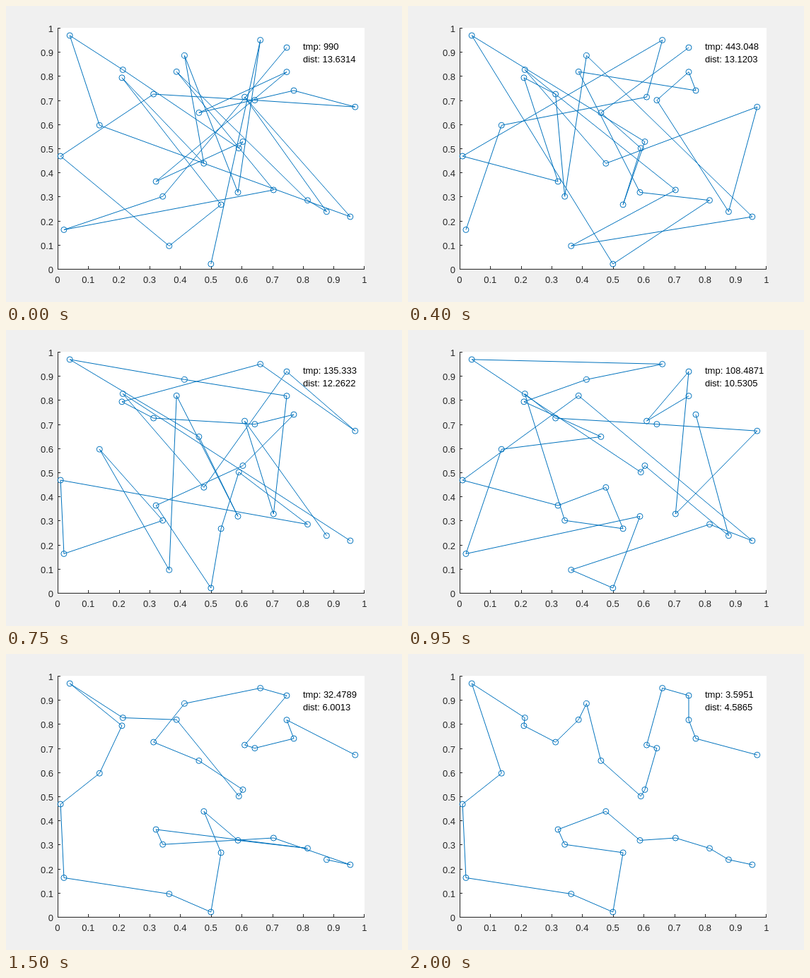
These frames come from a looping animation (560 px wide and 420 px high, 2500 ms). An HTML page:

```html
<!DOCTYPE html>
<html lang="en">
<head>
<meta charset="utf-8">
<title>Simulated annealing tour</title>
<style>
  html, body { margin: 0; width: 100%; height: 100%; overflow: hidden; background: #f0f0f0; }
  svg { display: block; width: 560px; height: 420px; }
  text { font: 13px "Liberation Sans", Arial, sans-serif; fill: #262626; }
  .axis { stroke: #262626; fill: none; shape-rendering: crispEdges; }
  .plot { stroke: #0072bd; fill: none; stroke-width: 1; }
  .info text { fill: #000; }
</style>
</head>
<body>
<svg viewBox="0 0 560 420">
  <rect x="73" y="31" width="434" height="343" fill="#fff"/>
  <path class="axis" id="axis"/>
  <g id="labels"></g>
  <g class="plot" id="cities"><path id="route" stroke-linejoin="round"/></g>
  <g class="info"><text id="tmp" x="420" y="62"/><text id="dist" x="420" y="80"/></g>
</svg>
<script>
const STEP = 50, LOOP = 2500, LAST = 40;
const $ = id => document.getElementById(id);
const px = x => 72.8 + 434 * x;
const py = y => 374 - 342.4 * y;

// City positions in thousandths, labelled A-Z then a-d
const names = 'ABCDEFGHIJKLMNOPQRSTUVWXYZabcd';
const spots = [
  [970, 674], [770, 742], [747, 819], [747, 920], [661, 951], [610, 715],
  [643, 702], [604, 530], [591, 503], [461, 650], [414, 887], [388, 820],
  [313, 727], [210, 795], [213, 828], [40, 970], [137, 598], [10, 470],
  [21, 165], [364, 98], [500, 23], [533, 269], [343, 303], [321, 365],
  [477, 440], [588, 320], [704, 330], [815, 287], [877, 240], [954, 219]
];
const city = {};
spots.forEach(([x, y], i) => { city[names[i]] = [x / 1000, y / 1000]; });

// Tours the search passes through: picture index, cooling count, length
const stops = [
  { at: 0, cool: 0, dist: 13.6314, tour: 'DWSaLbcFdQPOIHXCJBAGMRTVNYKZEU' },
  { at: 8, cool: 80, dist: 13.1203, tour: 'DJIVHPUbZLBCGcAYOaTdKWMNXREFQS' },
  { at: 15, cool: 198, dist: 12.2622, tour: 'cFaCKPJZLTQWSRbIVUXHBGMNEADYOd' },
  { at: 19, cool: 220, dist: 10.5305, tour: 'BcHIPEKNJQSZUTbdLRXYVWOMGAaDFC' },
  { at: 25, cool: 279, dist: 8.2625, tour: 'EGbDCFJBAaZIHMNPQRSVYXLOKTUWcd' },
  { at: 30, cool: 340, dist: 6.0013, tour: 'ACBGFDEKMJHILOPNQRSTUVYZbXWadc' },
  { at: 33, cool: 395, tour: 'ACBGFDEKMJHILOPNQRSTUVWXYZabcd' },
  { at: 40, cool: 559, dist: 4.5865, tour: names }
];

const short = n => String(+n.toFixed(4));

function tourLength(tour) {
  let sum = 0;
  for (let i = 1; i < tour.length; i++) {
    const [a, b] = city[tour[i - 1]], [c, d] = city[tour[i]];
    sum += Math.hypot(a - c, b - d);
  }
  return sum;
}

// Segment reversals that turn one tour into another, last city first
function reversals(from, to) {
  const steps = [from];
  let tour = [...from];
  for (let i = to.length - 1; i >= 0; i--) {
    const j = tour.indexOf(to[i]);
    if (j === i) continue;
    tour = [...tour.slice(0, j), ...tour.slice(j, i + 1).reverse(), ...tour.slice(i + 1)];
    steps.push(tour.join(''));
  }
  return steps;
}

function picture(tour, cool, dist = tourLength(tour)) {
  return {
    route: 'M' + [...tour].map(c => px(city[c][0]) + ' ' + py(city[c][1])).join('L'),
    tmp: 'tmp: ' + short(990 * 0.99 ** cool),
    dist: 'dist: ' + short(dist)
  };
}

const pictures = [];
stops.forEach((a, n) => {
  pictures[a.at] = picture(a.tour, a.cool, a.dist);
  const b = stops[n + 1];
  if (!b) return;
  const steps = reversals(a.tour, b.tour);
  for (let i = a.at + 1; i < b.at; i++) {
    const u = (i - a.at) / (b.at - a.at);
    pictures[i] = picture(steps[Math.round(u * (steps.length - 1))],
      Math.round(a.cool + u * (b.cool - a.cool)));
  }
});

function add(parent, tag, attrs, text = '') {
  const el = document.createElementNS('http://www.w3.org/2000/svg', tag);
  for (const key in attrs) el.setAttribute(key, attrs[key]);
  el.textContent = text;
  parent.append(el);
}

let axis = 'M73.5 31V374M73 373.5H507';
for (let i = 0; i <= 10; i++) {
  const v = i / 10;
  const x = Math.min(506, Math.round(px(v))), y = Math.round(373 - 342 * v);
  axis += `M${x + 0.5} 373V369M74 ${y + 0.5}H77`;
  add($('labels'), 'text', { x: px(v), y: 393, 'text-anchor': 'middle' }, v);
  add($('labels'), 'text', { x: 67, y: y + 6, 'text-anchor': 'end' }, v);
}
$('axis').setAttribute('d', axis);
for (const c of names) add($('cities'), 'circle', { cx: px(city[c][0]), cy: py(city[c][1]), r: 4 });

let shown = -1;
const start = performance.now();
function draw() {
  const t = (performance.now() - start) % LOOP;
  const i = Math.min(LAST, Math.floor(t / STEP));
  if (i !== shown) {
    shown = i;
    $('route').setAttribute('d', pictures[i].route);
    $('tmp').textContent = pictures[i].tmp;
    $('dist').textContent = pictures[i].dist;
  }
  requestAnimationFrame(draw);
}
draw();
</script>
</body>
</html>
```
